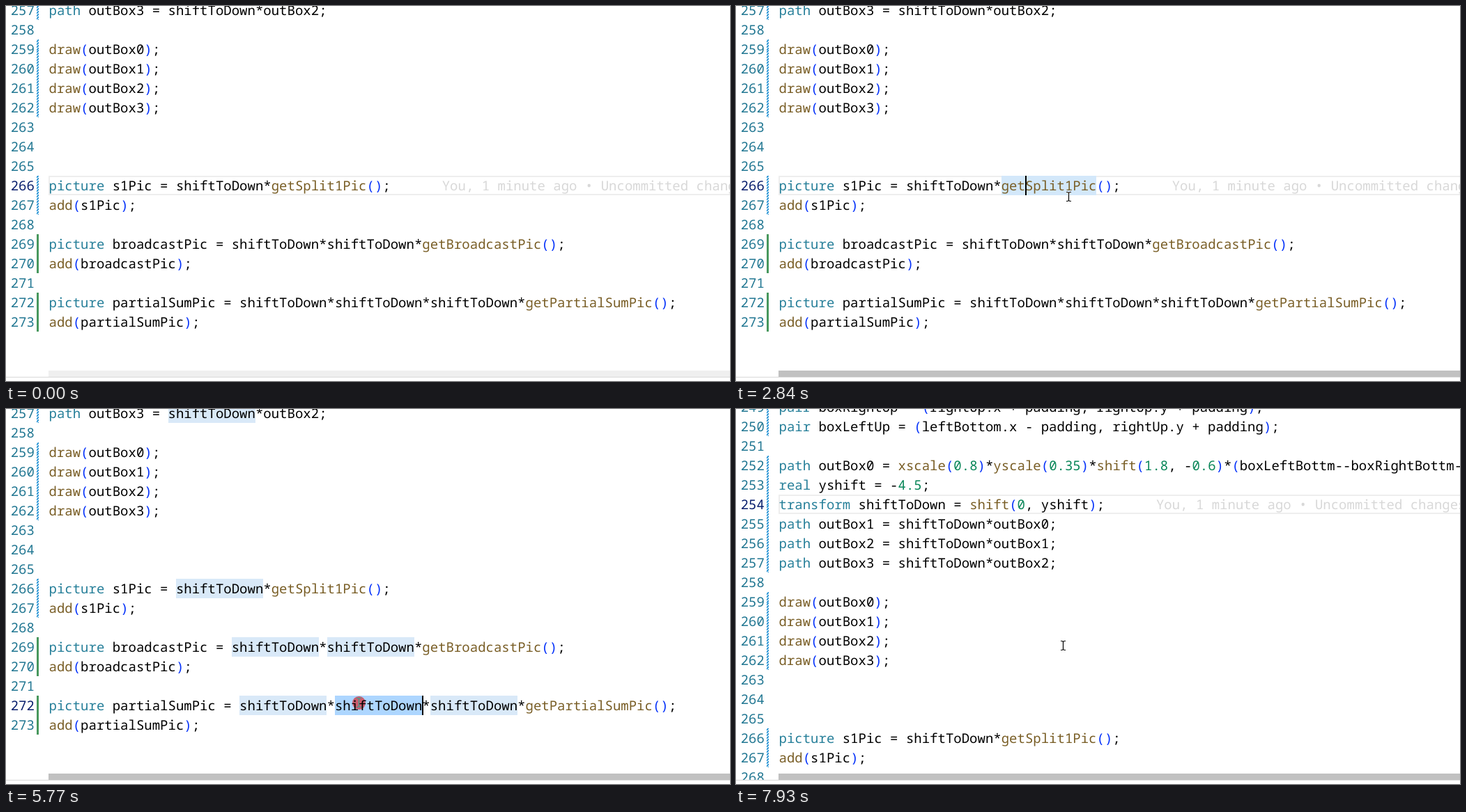
Recreate the animation shown at these times as an HTML page. Size 1039 by 539 pixels, loop 8000 ms.

```html
<!DOCTYPE html>
<html lang="en">
<head>
<meta charset="utf-8">
<title>Go to definition</title>
<style>
  html, body { margin: 0; width: 100%; height: 100%; overflow: hidden; background: #fff; }
  #stage { position: relative; width: 1039px; height: 539px; overflow: hidden; background: #fff; isolation: isolate; }
  #editor { position: absolute; inset: 0 0 5px; overflow: hidden;
    font: 19px/28px "Noto Sans Mono", "DejaVu Sans Mono", monospace;
    text-rendering: geometricPrecision; font-variant-ligatures: none; white-space: pre; }
  .view, .view > * { position: absolute; }
  .view { inset: 0; }
  .code { left: 61.5px; height: 28px; z-index: 1; }
  .number { left: 0; width: 40.9px; text-align: right; color: #237893; }
  .number.active { color: #0b216f; }
  .change { left: 44px; width: 3px; }
  .added { background: #48985d; }
  .modified { background: repeating-linear-gradient(-45deg, #2090d3 0 1.4px, #c3e1f3 1.4px 2.8px); }
  .guide { left: 62px; width: 1px; background: #d3d3d3; }
  .line { left: 61px; width: 990px; height: 28px; box-sizing: border-box; border: 2px solid #eee; }
  .blame { color: #d8d8d8; margin-left: 74px; }
  .caret { width: 2px; height: 28px; background: #000; z-index: 2; }
  .word { height: 28px; }
  .type { color: #267f99; } .func { color: #795e26; } .control { color: #af00db; }
  .num { color: #098658; } .quote { color: #a31515; } .math { color: #267f99; }
  .b0 { color: #0431fa; } .b1 { color: #319331; } .b2 { color: #7b3814; }
  #bar { position: absolute; left: 61px; right: 0; top: 524px; height: 10px; background: #646464; }
  #edge { position: absolute; left: 0; right: 0; top: 533px; height: 1px; background: #d8d8d8; }
  #menu { position: absolute; width: 227px; box-sizing: border-box; padding: 4px 0; background: #fff;
    box-shadow: 0 2px 7px rgba(0,0,0,.3); font: 11px/22px "Open Sans", sans-serif; color: #616161; }
  #menu div { display: flex; justify-content: space-between; height: 22px; padding: 0 20px; white-space: pre; }
  #menu .over { background: #0060c0; color: #fff; }
  #menu hr { margin: 5px 8px; border: 0; height: 1px; background: #d4d4d4; }
  #dot { position: absolute; width: 19px; height: 19px; margin: -9.5px; border-radius: 50%; background: rgba(214,36,42,.68); }
  .pointer { position: absolute; overflow: visible; width: 1px; height: 1px; }
  #beam { mix-blend-mode: difference; }
</style>
</head>
<body>
<div id="stage">
  <div id="editor"></div>
  <div id="bar"></div>
  <div id="edge"></div>
  <div id="menu"></div>
  <div id="dot"></div>
  <svg id="beam" class="pointer"><path d="M-3-6.5H-1L.5-5.5 2-6.5H4M.5-5.5V5.5M-3 6.5H-1L.5 5.5 2 6.5H4" fill="none" stroke="#fff" stroke-width="1.2"/></svg>
  <svg id="arrow" class="pointer"><path d="M0 0V16L3.7 12.5 6.2 18 8.6 17 6.2 11.6H11.3Z" fill="#fff" stroke="#000"/></svg>
</div>
<script>
const LOOP = 8000, ROW = 28, CHAR = 11.4, LEFT = 61.5;
const $ = id => document.getElementById(id);
const timed = [];

const within = (t, spans) => spans.some(([a, b]) => t >= a && t < b);
const during = (spans, set) => timed.push({ spans, set });
const show = (el, spans) => during(spans, on => el.style.display = on ? '' : 'none');

function make(parent, className, style = {}, text = '') {
  const el = parent.appendChild(document.createElement('div'));
  el.className = className;
  Object.assign(el.style, style);
  el.textContent = text;
  return el;
}

const span = (name, text) => `<span class="${name}">${text}</span>`;

// Colours one line; brackets take their colour from the nesting depth.
function highlight(text, state) {
  const token = /"[^"]*"|[A-Za-z_]\w*(\()?|\d+(\.\d+)?|[(){}]/g;
  const bracket = c => {
    const level = '({'.includes(c) ? state.depth++ : --state.depth;
    return span('b' + level % 3, c);
  };
  return text.replace(token, (s, call) => {
    if (s[0] === '"') {
      const inner = s.slice(1, -1).replace(/\d+/g, d => span('num', d));
      return span('quote', '"') + span('math', inner) + span('quote', '"');
    }
    if (/^\d/.test(s)) return span('num', s);
    if (/^[(){}]/.test(s)) return bracket(s);
    if (call) return span('func', s.slice(0, -1)) + bracket('(');
    if (/^(picture|path|real|pair|transform)$/.test(s)) return span('type', s);
    return s === 'return' ? span('control', s) : s;
  });
}

function makeView(first, top, depth, source, spans) {
  const el = make($('editor'), 'view');
  const lines = source.split('\n'), state = { depth }, numbers = {};
  const y = line => top + (line - first) * ROW;
  const place = (line, col) => ({ top: y(line) + 'px', left: LEFT + col * CHAR + 'px' });
  lines.forEach((text, i) => {
    const line = first + i;
    numbers[line] = make(el, 'number', { top: y(line) + 'px' }, line);
    make(el, 'code', { top: y(line) + 'px' }).innerHTML = highlight(text, state);
  });
  show(el, spans);
  return {
    strip(name, from, to) {
      make(el, name, { top: y(from) + 'px', height: (to - from + 1) * ROW + 'px' });
    },
    current(line, active, framed = active) {
      during(active, on => numbers[line].classList.toggle('active', on));
      show(make(el, 'line', { top: y(line) + 'px' }), framed);
    },
    blame(line, when) {
      const note = 'You, 1 minute ago • Uncommitted changes';
      show(make(el, 'blame', place(line, lines[line - first].length), note), when);
    },
    caret(line, col, when) { show(make(el, 'caret', place(line, col)), when); },
    word(line, col, length, background, when) {
      show(make(el, 'word', { ...place(line, col), width: length * CHAR + 'px', background }), when);
    }
  };
}

const tail = `draw(outBox0);
draw(outBox1);
draw(outBox2);
draw(outBox3);



picture s1Pic = shiftToDown*getSplit1Pic();
add(s1Pic);
`;

const calls = makeView(257, -8, 0, `path outBox3 = shiftToDown*outBox2;

${tail}
picture broadcastPic = shiftToDown*shiftToDown*getBroadcastPic();
add(broadcastPic);

picture partialSumPic = shiftToDown*shiftToDown*shiftToDown*getPartialSumPic();
add(partialSumPic);`, [[0, 2980], [3990, 7120]]);

const split = makeView(86, -17, 1, `
    label("$split(axis=0)$", point(logicalSubpic, NW), 2N);
    return pic;
}

picture getSplit1Pic()
{
    picture pic;
    real xshift = 1.3;
    real yshift = -1.3;
    picture logical1 = getRect("$1$");
    picture logical2 = getRect("$2$", (xshift, 0));
    picture logical3 = getRect("$3$", (0, yshift));
    picture logical4 = getRect("$4$", (xshift, yshift));
    picture logicalSubpic;
    add(logicalSubpic, logical1);
    add(logicalSubpic, logical2);
    add(logicalSubpic, logical3);
    add(logicalSubpic, logical4);
    add(pic, logicalSubpic);`, [[2980, 3990]]);

const boxes = makeView(249, -17, 0, `pair boxRightUp = (rightUp.x + padding, rightUp.y + padding);
pair boxLeftUp = (leftBottom.x - padding, rightUp.y + padding);

path outBox0 = xscale(0.8)*yscale(0.35)*shift(1.8, -0.6)*(boxLeftBottm--boxRightBottm--cycle);
real yshift = -4.5;
transform shiftToDown = shift(0, yshift);
path outBox1 = shiftToDown*outBox0;
path outBox2 = shiftToDown*outBox1;
path outBox3 = shiftToDown*outBox2;

${tail}`, [[7120, LOOP]]);

for (const [a, b] of [[257, 257], [259, 262], [266, 267]]) calls.strip('change modified', a, b);
for (const [a, b] of [[269, 270], [272, 273]]) calls.strip('change added', a, b);
split.strip('change added', 87, 89);
split.strip('change modified', 91, 105);
split.strip('guide', 86, 88);
split.strip('guide', 93, 105);
for (const [a, b] of [[249, 250], [252, 257], [259, 262], [266, 267]]) boxes.strip('change modified', a, b);

calls.current(266, [[0, 5570]]);
calls.current(272, [[5570, 7120]], [[5570, 5770]]);
split.current(91, [[2980, 3990]]);
boxes.current(254, [[7120, LOOP]]);

calls.blame(266, [[0, 2980], [4260, 5570]]);
calls.blame(272, [[5970, 7120]]);
split.blame(91, [[3180, 3990]]);
boxes.blame(254, [[7390, LOOP]]);

calls.caret(266, 31, [[1510, 2110], [2840, 2980], [3990, 4460], [4990, 5500]]);
calls.caret(272, 39, [[5570, 5770]]);
calls.caret(272, 47, [[5770, 6240]]);
split.caret(91, 8, [[2980, 3380], [3860, 3990]]);
boxes.caret(254, 10, [[7120, 7600]]);

calls.word(266, 28, 12, '#d3e8fa', [[1910, 2110], [2840, 2980]]);
for (const [line, col] of [[257, 15], [266, 16], [269, 23], [269, 35], [272, 24], [272, 48]]) {
  calls.word(line, col, 11, '#d9e9f8', [[5770, 6240]]);
  calls.word(line, col, 11, '#e8f3ff', [[6240, 7120]]);
}
calls.word(272, 36, 11, '#add6ff', [[5770, 6240]]);
calls.word(272, 36, 11, '#e5e7ec', [[6240, 7120]]);

const menuSpans = [[2110, 2840], [6380, 7120]];
$('menu').innerHTML = `Go to Definition|F12
Go to References|Shift+F12
Peek|›
-
Rename Symbol|F2
Change All Occurrences|Ctrl+F2
Format Document|Shift+Alt+F
-
Cut|Ctrl+X
Copy|Ctrl+C
Paste|Ctrl+V
-
Command Palette...|Ctrl+Shift+P`.split('\n').map(item => {
  const [label, key] = item.split('|');
  return key ? `<div><span>${label}</span><span>${key}</span></div>` : '<hr>';
}).join('');
const items = [...$('menu').querySelectorAll('div')];

show($('menu'), menuSpans);
show($('arrow'), menuSpans);
show($('beam'), [[330, 2110], [2840, 6380], [7120, LOOP]]);
show($('dot'), [[1510, 1640], [1980, 2110], [2710, 2840], [5570, 5700], [5770, 5900], [6240, 6380], [7050, 7120]]);

// time, x, y
const path = [
  [330, 1036, 430], [1100, 405, 260], [1170, 405, 260], [1310, 414, 260], [1440, 414, 260],
  [1510, 418, 260], [2300, 418, 260], [2510, 477, 274], [4670, 477, 274], [4730, 485, 282],
  [5100, 556, 372], [5500, 506, 422], [6510, 506, 422], [6650, 535, 488], [6790, 545, 434],
  [7320, 545, 434], [7930, 469, 340], [LOOP, 469, 340]
];

function pointerAt(t) {
  const i = Math.max(1, path.findIndex(p => p[0] >= t));
  const [t0, x0, y0] = path[i - 1], [t1, x1, y1] = path[i];
  const u = Math.min(1, Math.max(0, (t - t0) / (t1 - t0)));
  const k = u * u * (3 - 2 * u);
  return [x0 + (x1 - x0) * k, y0 + (y1 - y0) * k];
}

function render(t) {
  for (const { spans, set } of timed) set(within(t, spans));
  $('bar').style.opacity = 0.1 + 0.3 * Math.min(1, Math.max(0, (t - 330) / 140));

  const [x, y] = pointerAt(t);
  for (const id of ['beam', 'arrow', 'dot']) {
    $(id).style.left = Math.round(x) + 'px';
    $(id).style.top = Math.round(y) + 'px';
  }

  const [left, top] = t < 5000 ? [418, 258] : [506, 422];
  $('menu').style.left = left + 'px';
  $('menu').style.top = top + 'px';
  for (const item of items) {
    const dy = y - top - item.offsetTop;
    item.classList.toggle('over', x > left && dy >= 0 && dy < 22);
  }
}

const start = performance.now();
function tick() {
  render((performance.now() - start) % LOOP);
  requestAnimationFrame(tick);
}
tick();
</script>
</body>
</html>
```
